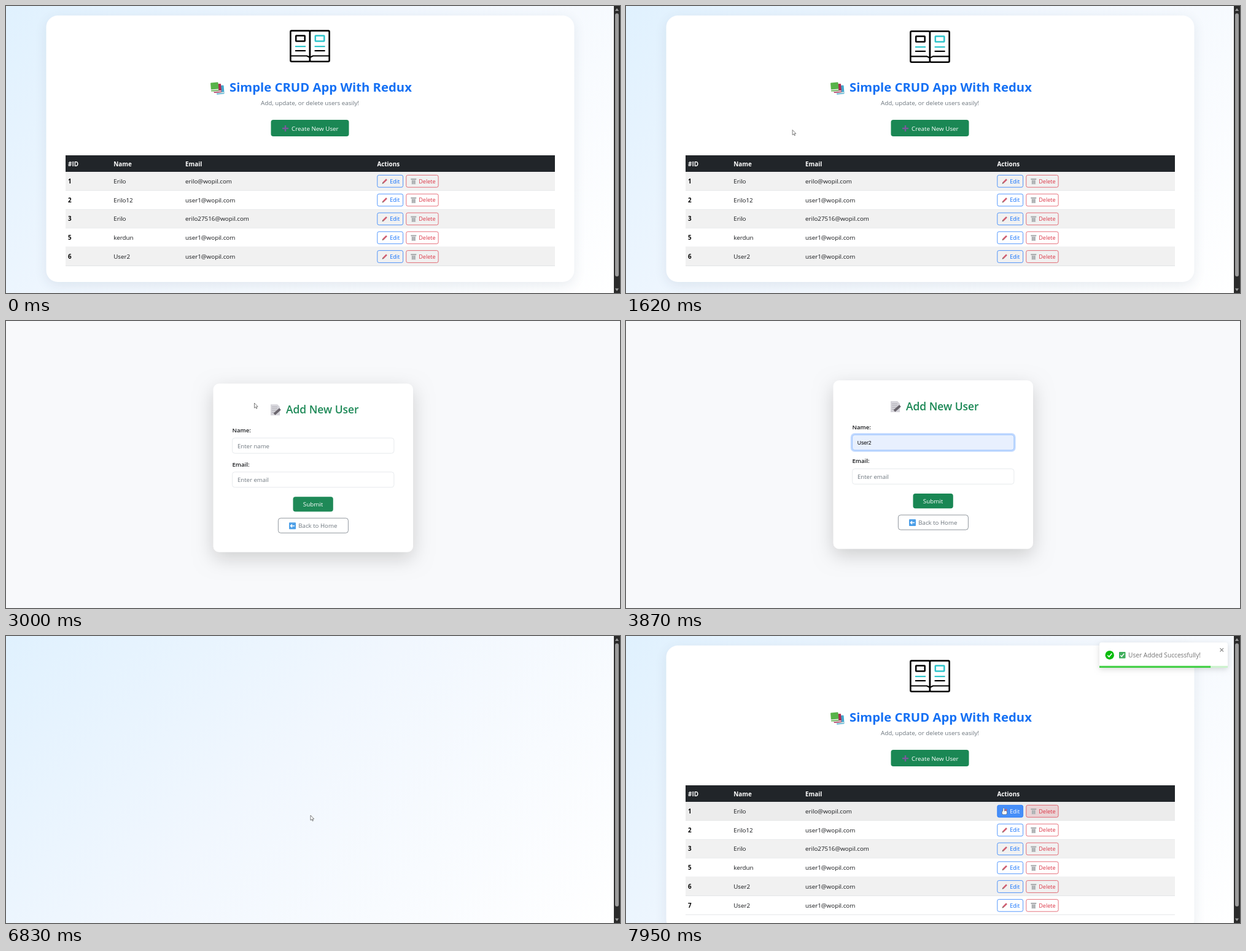
An HTML page with a canvas for the animation above (8 s loop, 1000x469 px).

```html
<!DOCTYPE html>
<html lang="en">
<head>
<meta charset="utf-8">
<title>Simple CRUD App</title>
<style>
html, body { margin: 0; width: 100%; height: 100%; overflow: hidden; }
canvas { display: block; width: 100%; height: 100%; }
</style>
</head>
<body>
<canvas id="stage" width="1000" height="469"></canvas>
<script>
const W = 1000, H = 469, LOOP = 8000;
const c = document.getElementById('stage').getContext('2d');
const UI = '"Open Sans", "Noto Sans", sans-serif';
const PLAIN = '"Liberation Sans", Arial, sans-serif';
const GREEN = '#198754', BLUE = '#0d6efd', RED = '#dc3545', GRAY = '#6c757d';
const INK = '#16181b', DARK = '#212529', TEAL = '#2fc4cb', PAPER = '#f8f9fb';

// Moments in ms
const FORM_AT = 2177, LIST_AT = 6790, FADE_AT = 6830, TOAST_AT = 6850;

const DOMAIN = '@wopil.com';
const USERS = ['Erilo erilo', 'Erilo12 user1', 'Erilo erilo27516', 'kerdun user1', 'User2 user1', 'User2 user1']
  .map(s => s.split(' '));

const clamp = v => Math.max(0, Math.min(1, v));
const mix = (a, b, k) => a + (b - a) * k;
const smooth = k => k * k * (3 - 2 * k);
const ramp = (t, a, b) => smooth(clamp((t - a) / (b - a)));
// Rises over 150 ms from a, falls over 150 ms from b
const hover = (t, a, b) => ramp(t, a, a + 150) * (1 - ramp(t, b, b + 150));

function bezier(x1, y1, x2, y2) {
  const curve = (a, b, s) => 3 * a * s * (1 - s) ** 2 + 3 * b * s * s * (1 - s) + s ** 3;
  return x => {
    x = clamp(x);
    let lo = 0, hi = 1;
    for (let i = 0; i < 24; i++) {
      const m = (lo + hi) / 2;
      if (curve(x1, x2, m) < x) lo = m; else hi = m;
    }
    return curve(y1, y2, hi);
  };
}
const ease = bezier(.25, .1, .25, 1);
const easeOut = bezier(.215, .61, .355, 1);

/* Drawing helpers */

function rect(x, y, w, h, fill) {
  c.fillStyle = fill;
  c.fillRect(x, y, w, h);
}

function box(x, y, w, h, r, fill, stroke, lw = .75) {
  c.beginPath();
  c.roundRect(x, y, w, h, r);
  if (fill) { c.fillStyle = fill; c.fill(); }
  if (stroke) { c.strokeStyle = stroke; c.lineWidth = lw; c.stroke(); }
}

function shape(d, fill, stroke, lw = 1) {
  const p = new Path2D(d);
  if (fill) { c.fillStyle = fill; c.fill(p); }
  if (stroke) { c.strokeStyle = stroke; c.lineWidth = lw; c.stroke(p); }
}

function panel(x, y, w, h, r, dy, blur, shade) {
  c.save();
  c.shadowColor = shade;
  c.shadowBlur = blur;
  c.shadowOffsetY = dy;
  box(x, y, w, h, r, '#fff');
  c.restore();
}

// Capitals are centred on cy
function text(s, x, cy, size = 9.8, color = INK, weight = 400, family = UI) {
  c.font = `${weight} ${size}px ${family}`;
  c.fillStyle = color;
  c.fillText(s, x, cy + size * .357);
}

function at(x, y, draw) {
  c.save();
  c.translate(x, y);
  draw();
  c.restore();
}

function faded(alpha, draw) {
  if (alpha <= 0) return;
  c.save();
  c.globalAlpha *= alpha;
  draw();
  c.restore();
}

// 135 degree gradient over the 990 px wide page
const span = (990 + H) / 4;
const sky = c.createLinearGradient(495 - span, H / 2 - span, 495 + span, H / 2 + span);
sky.addColorStop(0, '#e0f1fe');
sky.addColorStop(.45, '#f1f7fe');
sky.addColorStop(1, '#fff');

/* Icons */

function book() {
  for (const side of [0, 1]) {
    const x = 1.4 + side * 31.6, tint = side ? TEAL : '#000';
    box(x, 1.4, 31.6, 50.4, 2, '#fff', '#000', 2.6);
    box(x + 8.8, 9.5, 14.5, 9, .5, null, tint, 2.5);
    rect(x + 7.6, 26, 17, 2.2, TEAL);
    rect(x + 7.6, 33, 17, 2.2, '#000');
  }
  shape('M2 42.5H28L33 45L38 42.5H64', null, '#000', 2.2);
}

function books() {
  ['#45a6cc', '#b02a55', '#58b34a'].forEach((color, i) => at(9 - i * 4.5, 6 - i * 2.5, () => {
    c.transform(1, -.08, .08, 1, 0, 0);
    box(0, 0, 12.5, 14, 1, color);
    rect(0, 11, 12, 1.6, '#e8f0ea');
  }));
}

function plus() {
  rect(-1.2, -5, 2.4, 10, '#7a5a9c');
  rect(-5, -1.2, 10, 2.4, '#7a5a9c');
}

function pencil() {
  c.rotate(-Math.PI / 4);
  rect(-3.5, -1.3, 8, 2.6, '#cf5d70');
  shape('M-3.5 -1.3L-6 0L-3.5 1.3Z', '#6b5a55');
}

function bin() {
  rect(-4.5, -4.5, 9, 2, '#a7a9ab');
  rect(-3.4, -2, 6.8, 7, '#c3c5c7');
  for (const x of [-1.6, .9]) rect(x, -1.5, .8, 6, '#8f9193');
}

function memo() {
  shape('M0 0H11L15 4V18H0Z', '#d5d4da');
  for (let y = 4; y < 16; y += 3) rect(2, y, 9, .8, '#a9a8b0');
  shape('M6 16L15.5 7.5', null, '#67626a', 4);
}

function backIcon() {
  box(0, 0, 11, 11, 1, '#4a9ee8');
  shape('M9 5.5H3M5 3L2.5 5.5L5 8', null, '#fff', 1.5);
}

function tick(x, y, r, lw) {
  at(x, y, () => {
    c.scale(r, r);
    shape('M-1 .1L-.3 .8L1 -.8', null, '#fff', lw / r);
  });
}

function arrow() {
  shape('M0 0V8.2L1.9 6.5L3.2 9.3L4.4 8.8L3.2 6H5.7Z', '#fff', '#4a4a4a', .7);
}

function hand() {
  box(-2.6, 4.4, 8, 6.4, 2, '#fff', '#555', .6);
  box(-1, 0, 2.2, 7, 1.1, '#fff', '#555', .5);
  rect(-.7, 4, 1.6, 3, '#fff');
}

/* User list */

const TABLE = { x: 97, y: 271, w: 797, row: 30.8 };
const COLS = { '#ID': 101, Name: 175.2, Email: 292, Actions: 604.4 };

function action(label, icon, x, cy, w, color, k) {
  box(x, cy - 10, w, 19.8, 2.6, null, color, .7);
  faded(k, () => box(x, cy - 10, w, 19.8, 2.6, color));
  at(x + 12, cy, icon);
  text(label, x + 20.5, cy, 9, k > .5 ? '#fff' : color);
}

function userRow(i, t) {
  const [name, mail] = USERS[i], { x, y, w, row } = TABLE;
  const top = y + i * row, cy = top + 15.4;
  const over = i === 0 && t > 7640;
  rect(x, top, w, row, over ? '#ececec' : i % 2 ? '#fff' : '#f1f1f1');
  rect(x, top + row - .6, w, .7, '#dbdee1');
  text(String(i < 3 ? i + 1 : i + 2), COLS['#ID'], cy, 9.8, '#000', 700);
  text(name, COLS.Name, cy);
  text(mail + DOMAIN, COLS.Email, cy);
  action('Edit', pencil, 604.8, cy, 41.8, BLUE, over ? hover(t, 7850, LOOP) : 0);
  action('Delete', bin, 651.8, cy, 52.3, RED, over ? hover(t, 7640, 7835) : 0);
}

function listPage(t, count, alpha) {
  rect(0, 0, W, H, sky);
  if (alpha <= 0) return;
  panel(65.5, 15.5, 860, 281.5 + count * TABLE.row, 19, 5, 20, 'rgba(40,70,100,.1)');
  at(462, 39 + Math.sin(Math.PI * t / 2650) ** 2, book);
  at(333, 124.5, books);
  text('Simple CRUD App With Redux', 364, 133, 20.3, '#1470f4', 700);
  text('Add, update, or delete users easily!', 415, 158.3, 9.83, GRAY);
  box(431.5, 186, 127, 27, 4, t > 1930 && t < FORM_AT ? '#157347' : '#1a8754');
  at(455, 200, plus);
  text('Create New User', 465, 200.3, 9.8, '#fff');
  rect(TABLE.x, 244, TABLE.w, 27, DARK);
  for (const name in COLS) text(name, COLS[name], 258, 9.9, '#fff', 700);
  for (let i = 0; i < count; i++) userRow(i, t);
  faded(1 - alpha, () => rect(0, 0, W, H, sky));
}

/* Form */

function field(y, name, value, preview, focus) {
  const cy = y + 13;
  text(name + ':', 368.5, y - 12.6, 9.6, INK, 600);
  faded(.25 * focus, () => box(367.2, y - 1.3, 266, 27.6, 5, null, BLUE, 2.8));
  box(368.6, y, 263.3, 25, 4, value ? '#e8f0fe' : '#fff', focus > .5 ? '#86b7fe' : '#dfe3e7');
  if (!value) text('Enter ' + name.toLowerCase(), 377, cy, 9.6, GRAY);
  else if (preview) text(value, 376.7, cy + .4, 8.6, '#000', 400, PLAIN);
  else text(value, 376.7, cy);
}

function formPage(t) {
  const k = ease((t - FORM_AT) / 1000);
  const drop = 275.5 * (1 - k), end = 372.5 + drop, scrolls = end > H;
  const name = t < 3750 ? '' : 'User2';
  const hint = t >= 5200 && t < 5820;
  const mail = t < 4950 ? '' : hint ? 'erilo@wopil.co' : 'user1' + DOMAIN;
  rect(0, 0, W, H, PAPER);
  at(scrolls ? -5 : 0, drop, () => {
    panel(337.5, 97, 325.5, 275.5, 9.5, 10, 31, 'rgba(0,0,0,.175)');
    at(431, 131, memo);
    text('Add New User', 456, 139.7, 17.4, GREEN, 600);
    field(186, 'Name', name, t < 4290, hover(t, 3330, 4500));
    field(241.6, 'Email', mail, t < 5820, hover(t, 4500, 6560));
    box(467.5, 282, 65.3, 24.3, 4, t > 6400 ? '#157347' : GREEN);
    text('Submit', 483.8, 294.8, 9.8, '#fff');
    box(443.4, 317, 114, 24.2, 4, null, GRAY);
    at(461, 324, backIcon);
    text('Back to Home', 476.3, 329.7, 9.7, GRAY);
  });
  faded(1 - k, () => rect(0, 0, W, H, PAPER));
  if (scrolls) scrollbar(446 * H / end);
}

/* Overlays */

function scrollbar(len) {
  rect(990, 0, 10, H, '#2b2b2b');
  box(992, 12, 6, len, 3, '#9b9b9b');
  shape('M992 8L995 3.5L998 8ZM992 461.5L995 466L998 461.5Z', '#9b9b9b');
}

// Flies in from the right, then rings out around its place
function slide(p) {
  if (p < .6) return mix(1935, -16, easeOut(p / .6));
  const q = p - .6;
  return -16 * Math.exp(-3 * q) * Math.cos(Math.PI * q / .15) * (1 - p) / .4;
}

function toast(t) {
  const p = clamp((t - TOAST_AT) / 700);
  const left = 1 - clamp((t - TOAST_AT - 700) / 3000);
  faded(easeOut(p / .6), () => at(slide(p), 0, () => {
    panel(771, 10.5, 209, 41.5, 3.5, 2.5, 8, 'rgba(0,0,0,.14)');
    box(780.5, 24, 14.4, 14.4, 7.2, '#07bc0c');
    tick(787.8, 31.2, 3.5, 1.6);
    box(803, 26, 10.5, 10.5, 1, '#3fae5c');
    tick(808.2, 31.2, 3, 1.5);
    text('User Added Successfully!', 818, 31, 10.2, '#757575');
    shape('M967.5 20l5.5 5.5m0 -5.5l-5.5 5.5', null, '#8a8a8a', 1.1);
    rect(771, 48.8, 209, 3.2, '#cdf2ce');
    rect(771, 48.8, 209 * left, 3.2, '#45d048');
  }));
}

/* Pointer */

const SPOT = {
  outside: [-94, 205], create: [490, 201], rest: [404.5, 134],
  mail: [470, 262], submit: [496, 293], remove: [684, 288], edit: [615, 281]
};

function pointer(t) {
  if (t > 3330 && t < 6040) return;
  const glide = (a, b, from, to) => {
    const k = ramp(t, from, to);
    return SPOT[a].map((v, i) => mix(v, SPOT[b][i], k));
  };
  const [x, y] = t < 2160 ? glide('outside', 'create', 1100, 1990)
    : t < 3400 ? glide('create', 'rest', 2160, 2510)
    : t < 6840 ? glide('mail', 'submit', 6040, 6480)
    : t < 7780 ? glide('submit', 'remove', 6840, 7760)
    : glide('remove', 'edit', 7780, 7920);
  const onButton = (t > 1930 && t < FORM_AT) || (t > 6400 && t < LIST_AT) || t > 7640;
  at(x, y, onButton ? hand : arrow);
}

function draw(t) {
  if (t >= FORM_AT && t < LIST_AT) {
    formPage(t);
  } else {
    const saved = t >= LIST_AT;
    listPage(t, saved ? 6 : 5, saved ? ease((t - FADE_AT) / 1000) : 1);
    scrollbar(430);
    if (t >= TOAST_AT) toast(t);
  }
  pointer(t);
}

let start;
function loop(now) {
  start ??= now;
  draw((now - start) % LOOP);
  requestAnimationFrame(loop);
}
requestAnimationFrame(loop);
</script>
</body>
</html>
```
